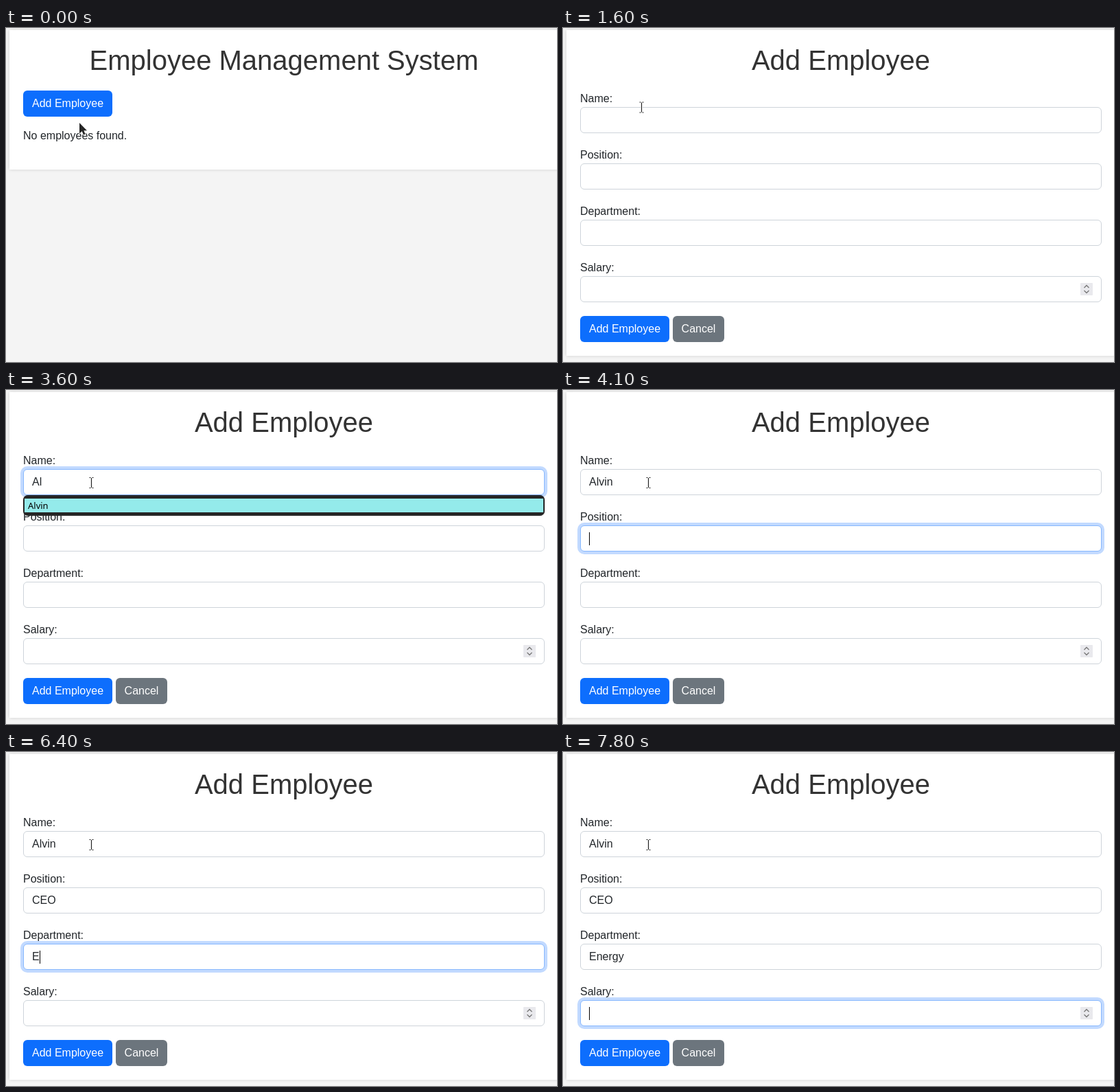
Recreate the animation shown at these times as an HTML page. Size 803 by 486 pixels, loop 8 s.

```html
<!DOCTYPE html>
<html lang="en">
<head>
<meta charset="utf-8">
<title>Employee Management System</title>
<style>
html, body { margin: 0; width: 100%; height: 100%; overflow: hidden; background: #f4f4f4; }
body { position: relative; font: 16px/24px "Liberation Sans", Arial, sans-serif; color: #212529; }
body div, h1, svg { position: absolute; box-sizing: border-box; margin: 0; white-space: pre; }
.card { left: 5px; top: 2.5px; width: 800px; background: #fff; box-shadow: 0 0 5px rgba(0,0,0,.15); }
#home { height: 203px; }
#form { height: 474.5px; }
h1 { left: 0; top: 20.5px; width: 800px; text-align: center; font: 40px/48px "Liberation Sans", Arial, sans-serif; color: #333; }
.btn { height: 38px; padding: 7px 0; text-align: center; color: #fff; background: #0d6efd; border-radius: 6px; }
.input { left: 25px; width: 760px; height: 38px; padding: 6px 12px; border: 1px solid #ced4da; border-radius: 6px; background: #fff; }
#caret { width: 1px; height: 19px; background: #000; }
#list { left: 25px; width: 760px; padding: 5px 2px; border-radius: 7px; background: #262626; box-shadow: 0 0 1px #0008; font: 13px/20px "Noto Sans", sans-serif; color: #ccc; }
#list p { margin: 0; padding-left: 5px; height: 20px; }
#list .on { background: #94ebeb; color: #000; }
#cursor { left: 0; top: 0; width: 1px; height: 1px; overflow: visible; }
#cursor path { stroke-linejoin: round; }
</style>
</head>
<body>
<div class="card" id="home">
  <h1>Employee Management System</h1>
  <div class="btn" id="add" style="left:20px;top:88.5px;width:130px">Add Employee</div>
  <div style="left:20px;top:142.5px">No employees found.</div>
</div>
<div class="card" id="form"><h1>Add Employee</h1></div>
<div id="fields">
  <div class="btn" style="left:25px;top:419px;width:130px">Add Employee</div>
  <div class="btn" style="left:160px;top:419px;width:75px;background:#6c757d">Cancel</div>
</div>
<svg id="spin" style="left:754px;top:371px" width="18" height="18">
  <rect width="18" height="18" rx="1" fill="#e9e9ed"/>
  <path d="M5.5 7L9 3.5L12.5 7M5.5 11L9 14.5L12.5 11" fill="none" stroke="#777" stroke-width="1.3"/>
</svg>
<div id="caret"></div>
<div id="list"></div>
<svg id="cursor">
  <g id="arrow"><path d="M0 0V15.5L3.7 12.2L6 17.5L8.6 16.4L6.4 11.2H11Z" fill="#262626" stroke="#fff" stroke-width="1.4" paint-order="stroke"/></g>
  <g id="hand"><path d="M-1.5 1Q0 -1 1.5 1V6L8 7.5Q9.5 8 9 10L8 16H0L-5 10Q-5.5 8 -3.5 8.5L-1.5 10Z" fill="#262626" stroke="#fff" stroke-width="1.4" paint-order="stroke"/></g>
  <g id="beam" fill="none">
    <path d="M-3 -7.5H3M-3 7.5H3M0 -7.5V7.5" stroke="#fff" stroke-width="3"/>
    <path d="M-3 -7.5H-1M1 -7.5H3M-3 7.5H-1M1 7.5H3M0 -7V7" stroke="#222" stroke-width="1.2"/>
  </g>
</svg>
<script>
const $ = id => document.getElementById(id);
const LOOP = 8000;
const ease = [.4, 1];
const start = {
  page: 'home', button: '#0d6efd', kind: 'arrow', x: 107, y: 138,
  text: ['', '', '', ''], focus: -1, prev: -1, mix: 1, caret: false, list: [], pick: false
};

const events = [];
const on = (time, change) => events.push([time, change]);
const move = (time, x, y, kind) => on(time, { x, y, kind });
const focus = (time, i) => {
  on(time, { focus: i, prev: i - 1, mix: ease[0], caret: true });
  on(time + 100, { mix: ease[1] });
};
const type = (time, i, value) => on(time, { i, value, caret: true });
const choose = (time, i, value) => on(time, { i, value, caret: true, list: [], pick: false });

move(100, 106.5, 136, 'arrow');
move(200, 106.5, 134.5, 'arrow');
move(400, 107, 127, 'hand');
on(400, { button: '#0c66ea' });
move(500, 108, 120, 'hand');
on(500, { button: '#0b5ed7' });
move(600, 110, 115, 'hand');
move(700, 111, 112, 'hand');
on(800, { button: '#0a58ca' });
on(900, { page: 'form' });
move(1000, 111, 112, 'arrow');
move(1100, 112, 111, 'arrow');
move(1600, 114.5, 115.5, 'beam');
move(1700, 117, 121, 'beam');
move(1800, 121, 129, 'beam');
move(1900, 124.5, 135, 'beam');
focus(2000, 0);
type(2500, 0, 'A');
on(2500, { list: ['Alvin', 'anotehr', 'Activity 1'] });
type(2800, 0, 'Al');
on(2900, { list: ['Alvin'] });
on(3100, { caret: false });
on(3600, { pick: true });
choose(3800, 0, 'Alvin');
focus(4000, 1);
type(4700, 1, 'C');
on(4700, { list: ['CEO'] });
on(5200, { pick: true, caret: false });
choose(5500, 1, 'CEO');
focus(5800, 2);
type(6400, 2, 'E');
on(6500, { list: ['Energy'] });
type(6600, 2, 'En');
on(7000, { pick: true });
on(7100, { caret: false });
choose(7400, 2, 'Energy');
focus(7700, 3);

const top0 = i => 115 + 82 * i;
const addDiv = (cls, style, text) => {
  const d = document.createElement('div');
  d.className = cls;
  d.style.cssText = style;
  d.textContent = text;
  return $('fields').appendChild(d);
};
const inputs = ['Name:', 'Position:', 'Department:', 'Salary:'].map((label, i) => {
  addDiv('', `left:25px;top:${top0(i) - 24}px`, label);
  return addDiv('input', `top:${top0(i)}px`, '');
});

const pen = document.createElement('canvas').getContext('2d');
pen.font = '16px "Liberation Sans", Arial, sans-serif';

function stateAt(t) {
  const s = { ...start, text: [...start.text] };
  for (const [time, change] of events) {
    if (time > t) break;
    Object.assign(s, change);
    if ('value' in change) s.text[change.i] = change.value;
  }
  return s;
}

function draw(t) {
  const s = stateAt(t), form = s.page === 'form';
  const show = (id, yes) => $(id).style.display = yes ? '' : 'none';
  show('home', !form);
  for (const id of ['form', 'fields', 'spin']) show(id, form);
  $('add').style.background = s.button;

  inputs.forEach((el, i) => {
    const k = i === s.focus ? s.mix : i === s.prev ? 1 - s.mix : 0;
    el.textContent = s.text[i];
    el.style.borderColor = `color-mix(in srgb, #86b7fe ${k * 100}%, #ced4da)`;
    el.style.boxShadow = k ? `0 0 0 4px rgba(13,110,253,${k / 4})` : 'none';
  });

  const y = top0(s.focus);
  show('caret', s.caret);
  if (s.caret) {
    $('caret').style.left = Math.round(38 + pen.measureText(s.text[s.focus]).width) + 'px';
    $('caret').style.top = y + 10 + 'px';
  }
  show('list', s.list.length);
  $('list').style.top = y + 38 + 'px';
  $('list').innerHTML = s.list.map(x => `<p class="${s.pick ? 'on' : ''}">${x}</p>`).join('');

  for (const kind of ['arrow', 'hand', 'beam']) show(kind, kind === s.kind);
  $(s.kind).setAttribute('transform', `translate(${s.x} ${s.y})`);
}

function frame() {
  draw(performance.now() % LOOP);
  requestAnimationFrame(frame);
}
frame();
</script>
</body>
</html>
```
